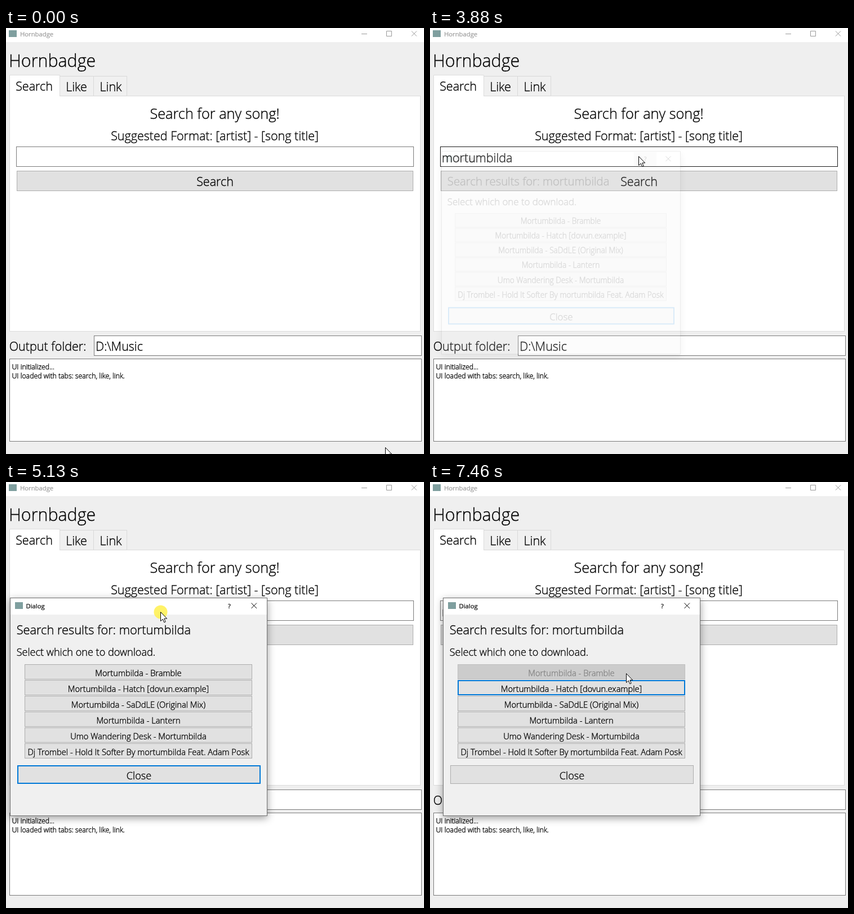
Recreate the animation shown at these times as an HTML page. Size 742 by 755 pixels, loop 8000 ms.

```html
<!DOCTYPE html>
<html lang="en">
<head>
<meta charset="utf-8">
<title>Hornbadge</title>
<style>
  html, body { margin: 0; width: 100%; height: 100%; overflow: hidden; background: #efefef; }
  svg { display: block; width: 742px; height: 755px; }
  text {
    font-family: "Open Sans", "Noto Sans", sans-serif; font-weight: 300; white-space: pre;
    color: #000; fill: currentColor; stroke: currentColor; stroke-width: .35px;
  }
  .cap { font-weight: 400; font-size: 11.25px; stroke-width: .2px; }
  .mid { text-anchor: middle; }
  #frame { filter: drop-shadow(0 4px 7px rgba(0, 0, 0, .38)); }
</style>
</head>
<body>
<svg id="stage" viewBox="0 0 742 755"></svg>
<script>
const LOOP = 8000;
const QUERY = "mortumbilda";
const KEYS = [1460, 1610, 1920, 2320, 2390, 2630, 2710, 2790, 2940, 3110, 3260];
const RESULTS = [
  "Mortumbilda - Bramble",
  "Mortumbilda - Hatch [dovun.example]",
  "Mortumbilda - SaDdLE (Original Mix)",
  "Mortumbilda - Lantern",
  "Umo Wandering Desk - Mortumbilda",
  "Dj Trombel - Hold It Softer By mortumbilda Feat. Adam Posk"
];
// time, opacity, scale of the opening dialog
const OPENING = [
  [3880, .15, .93], [3970, .46, .965], [4050, .73, .985],
  [4130, .9, .994], [4210, .97, .998], [4280, 1, 1]
];
// start, end, number of steps, x, y
const MOVES = [
  [70, 686, 9, 370, 227],
  [4600, 4830, 4, 271, 230],
  [5060, 5290, 4, 290, 230],
  [5590, 6370, 11, 330, 335],
  [6450, 6530, 2, 348, 339]
];
const CLICKS = [[763, 840], [5060, 5590], [6680, 6760]];
const LOOKS = {
  plain: ["#e1e1e1", "#adadad", 1],
  hover: ["#e5f1fb", "#0078d7", 1],
  focus: ["#e1e1e1", "#0078d7", 2],
  focusHover: ["#e5f1fb", "#0078d7", 2],
  press: ["#cce4f7", "#005499", 1],
  off: ["#cccccc", "#bfbfbf", 1]
};

const stage = document.getElementById("stage");

function add(parent, tag, attrs, content) {
  const el = document.createElementNS("http://www.w3.org/2000/svg", tag);
  set(el, attrs);
  if (content) el.textContent = content;
  parent.append(el);
  return el;
}
function set(el, attrs) {
  for (const key in attrs) el.setAttribute(key, attrs[key]);
}
// the border lies wholly inside the outer pixel edges
function inset([x, y, right, bottom], width) {
  return {
    x: x + width / 2, y: y + width / 2,
    width: right - x - width, height: bottom - y - width, "stroke-width": width
  };
}
function box(parent, x, y, right, bottom, fill, stroke) {
  return add(parent, "rect", { ...inset([x, y, right, bottom], 1), fill, stroke });
}
function label(parent, x, y, size, content, mid) {
  return add(parent, "text", { x, y, "font-size": size, class: mid ? "mid" : "" }, content);
}
function caption(parent, x, y, content) {
  return add(parent, "text", { x, y, class: "cap" }, content);
}
function line(parent, d) {
  return add(parent, "path", { d, fill: "none", stroke: "#000" });
}
function icon(parent, x, y) {
  add(parent, "rect", { x, y, width: 14, height: 12, fill: "#7f9f9f" });
}
function button(parent, x, y, right, bottom, size, baseline, content) {
  return {
    edges: [x, y, right, bottom],
    rect: add(parent, "rect", {}),
    text: label(parent, (x + right) / 2, baseline, size, content, true)
  };
}
function dress(btn, look) {
  const [fill, stroke, width] = LOOKS[look];
  set(btn.rect, { ...inset(btn.edges, width), fill, stroke });
  btn.text.style.color = look === "off" ? "#838383" : "#000";
}

// main window
add(stage, "rect", { width: 742, height: 755, fill: "#efefef" });
add(stage, "rect", { width: 742, height: 25, fill: "#fff" });
icon(stage, 5, 4);
const name = caption(stage, 25, 14.5, "Hornbadge");
const controls = line(stage, "M631 10.5H641M675.5 5.5H684.5V14.5H675.5ZM720 5.5L729 14.5M729 5.5L720 14.5");
label(stage, 5, 69, 30.4, "Hornbadge");

box(stage, 6, 120, 736, 538, "#fff", "#dcdcdc");
box(stage, 95, 85, 156, 121, "#f0f0f0", "#d9d9d9");
box(stage, 155, 85, 215, 121, "#f0f0f0", "#d9d9d9");
add(stage, "path", { d: "M6.5 122V83.5H95.5V121", fill: "#fff", stroke: "#dcdcdc" });
add(stage, "rect", { x: 7, y: 119, width: 88, height: 4, fill: "#fff" });
label(stage, 50, 111, 21.5, "Search", true);
label(stage, 125, 112, 21.5, "Like", true);
label(stage, 186, 112, 21.5, "Link", true);
label(stage, 370.5, 161, 25.3, "Search for any song!", true);
label(stage, 370.5, 199, 21.5, "Suggested Format: [artist] - [song title]", true);

const field = box(stage, 18, 210, 724, 246, "#fff", "#7a7a7a");
const typed = label(stage, 21, 238, 21.5, "");
const caret = add(stage, "rect", { y: 213, width: 1.3, height: 30, fill: "#000" });
const go = button(stage, 19, 253, 723, 289, 21.5, 280, "Search");

label(stage, 5.7, 572, 21.5, "Output folder:");
box(stage, 156, 545, 738, 581, "#fff", "#7a7a7a");
label(stage, 159, 572, 21.5, "D:\\Music");
box(stage, 6, 586, 738, 733, "#fff", "#7a7a7a");
label(stage, 10.5, 605, 12.3, "UI initialized...");
label(stage, 10.5, 621, 12.3, "UI loaded with tabs: search, like, link.");

// results dialog
const dialog = add(stage, "g", {});
add(dialog, "rect", { id: "frame", x: 4.5, y: 205.5, width: 456, height: 386, fill: "#f0f0f0", stroke: "#707070" });
add(dialog, "rect", { x: 5, y: 206, width: 455, height: 29, fill: "#fff" });
const help = add(dialog, "rect", { x: 371.5, y: 206, width: 43.5, height: 28, fill: "#e5e5e5" });
icon(dialog, 13, 213);
caption(dialog, 32.5, 224, "Dialog");
set(caption(dialog, 393.5, 224, "?"), { class: "cap mid" });
line(dialog, "M432.5 214.5L442 224M442 214.5L432.5 224");
label(dialog, 15.7, 270, 21.8, "Search results for: " + QUERY);
label(dialog, 15.7, 308, 18.1, "Select which one to download.");
const rows = RESULTS.map((song, i) => {
  const y = 323 + 28 * i;
  return button(dialog, 30, y, 434, y + 27, 14.7, y + 20.5, song);
});
const close = button(dialog, 17, 502, 449, 535, 18.1, 527, "Close");

// pointer
const pointer = add(stage, "g", {});
const glow = add(pointer, "circle", { r: 12, fill: "#fff04d", opacity: .85 });
const arrow = add(pointer, "path", {
  d: "M0 0V16L3.8 12.6L6.3 18.3L8.7 17.3L6.3 11.6H11.2Z", fill: "#fff", stroke: "#000", "stroke-linejoin": "round"
});
const beam = line(pointer, "M-1.5 -6.5H1L1.5 -6L2 -6.5H4.5M1.5 -6V8M-1.5 8.5H1L1.5 8L2 8.5H4.5");

const show = (el, on) => el.setAttribute("visibility", on ? "visible" : "hidden");
const ease = p => p * p * (3 - 2 * p);

function stepped(t, start, end, n) {
  if (t < start) return 0;
  return Math.min(1, (Math.floor((t - start) / (end - start) * (n - 1) + 1e-6) + 1) / n);
}
function pointerAt(t) {
  let x = 673, y = 743;
  for (const [start, end, n, toX, toY] of MOVES) {
    const p = ease(stepped(t, start, end, n));
    x += (toX - x) * p;
    y += (toY - y) * p;
  }
  return [x, y];
}

function drawMain(t, y) {
  const active = t >= 763 && t < 3880;
  const shade = active ? "#000" : "#999";
  name.style.color = shade;
  controls.setAttribute("stroke", shade);

  const open = t >= 3880;
  const inField = y > 210 && y < 246;
  const fade = stepped(t, 4430, 4830, 5);
  const grey = !inField && !open ? 122 : Math.round(26 + 96 * fade);
  field.setAttribute("stroke", `rgb(${grey},${grey},${grey})`);
  dress(go, !open && y >= 253 && y < 289 ? "hover" : "plain");

  const text = QUERY.slice(0, KEYS.filter(k => t >= k).length);
  if (typed.textContent !== text) typed.textContent = text;
  caret.setAttribute("x", text ? 21 + typed.getComputedTextLength() : 21);
  show(caret, active && (t < 1310 || t >= KEYS[0]));

  show(beam, !open && inField);
  show(arrow, open || !inField);
}

function drawDialog(t, y) {
  const phase = OPENING.filter(s => t >= s[0]).pop();
  dialog.style.display = phase ? "" : "none";
  if (!phase) return;
  const [, opacity, scale] = phase;
  const shift = Math.round(19 * ease(stepped(t, 5060, 5290, 4)));
  set(dialog, {
    opacity,
    transform: `translate(${232.5 + shift} 398.5) scale(${scale}) translate(-232.5 -398.5)`
  });
  show(help, t < 5060);

  rows.forEach(row => dress(row, "plain"));
  if (t >= 7460) {
    dress(rows[0], "off");
    dress(rows[1], "focus");
  } else if (t >= 6760) dress(rows[0], "focusHover");
  else if (t >= 6680) dress(rows[0], "press");
  else if (y >= 324) dress(rows[0], "hover");
  dress(close, t < 6680 ? "focus" : "plain");
}

function render(t) {
  const [x, y] = pointerAt(t);
  pointer.setAttribute("transform", `translate(${Math.round(x) + .5} ${Math.round(y) + .5})`);
  show(glow, CLICKS.some(([from, to]) => t >= from && t < to));
  drawMain(t, y);
  drawDialog(t, y);
}

const began = performance.now();
function tick() {
  render((performance.now() - began) % LOOP);
  requestAnimationFrame(tick);
}
tick();
</script>
</body>
</html>
```
